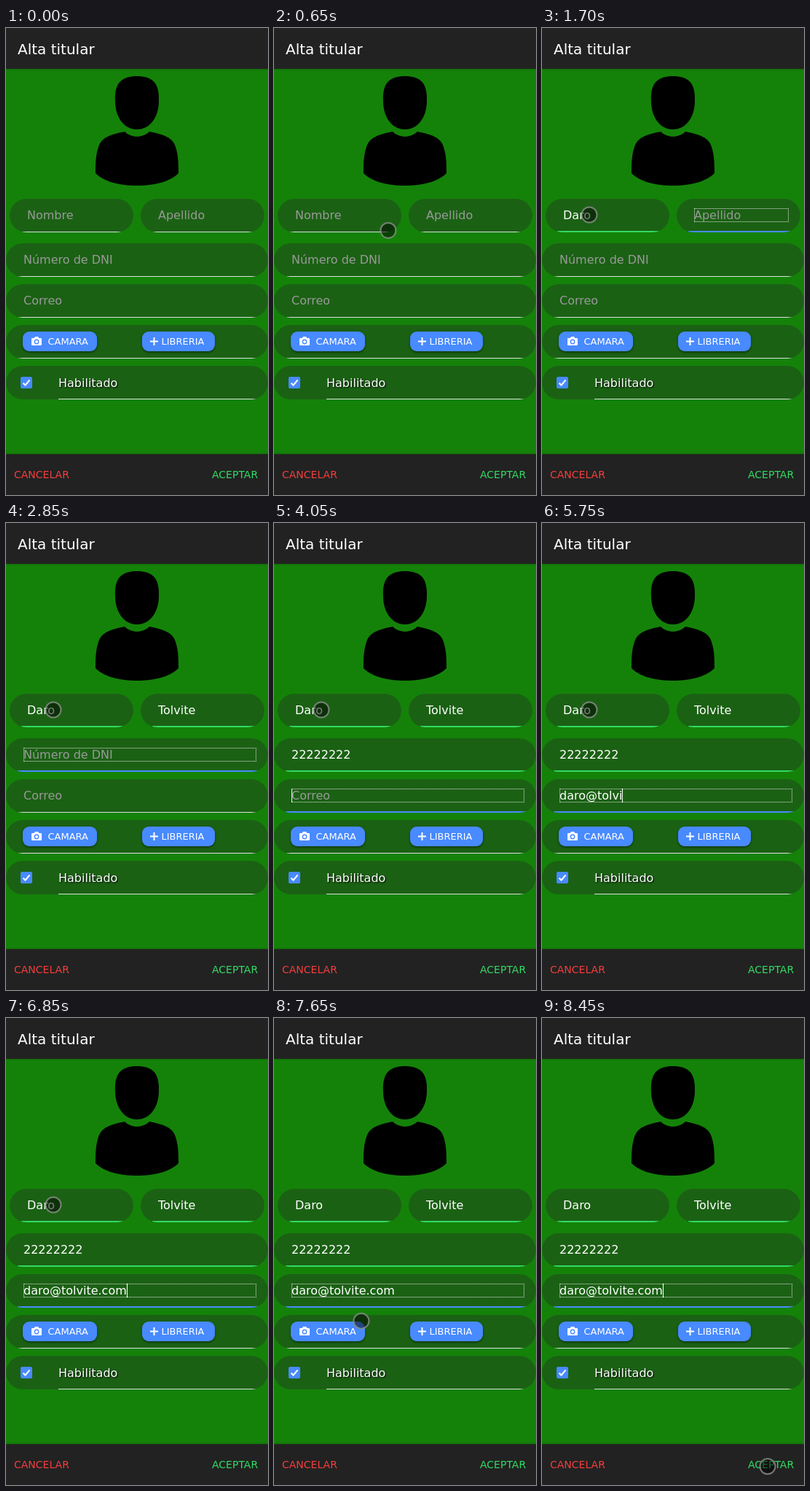
Write an HTML page that moves like this. It is 360 px wide and 640 px high and loops after 8.5 s.

```html
<!DOCTYPE html>
<html lang="es">
<head>
<meta charset="utf-8">
<title>Alta</title>
<style>
  html, body { margin: 0; width: 100%; height: 100%; overflow: hidden; background: #148209; }
  body { position: relative; font: 16px/19px "DejaVu Sans", sans-serif; color: #fff; }
  svg { position: absolute; left: 0; top: 0; }
  .pill { position: absolute; height: 46px; border-radius: 23px; overflow: hidden; background: #1b6114; }
  .line { position: absolute; left: 16px; right: 0; bottom: 0; height: 1px; background: #dedede; }
  .input { position: absolute; left: 24px; right: 16px; top: 13px; height: 19px; white-space: pre; }
  .input.focus { outline: 1px dotted #e4e4e4; outline-offset: -1px; }
  .hint { position: absolute; left: 0; top: 0; color: #999; }
  .value { display: inline-block; height: 19px; border-right: 1px solid transparent; }
  .value.caret { border-color: #fff; }
  .button { position: absolute; top: 416px; height: 27px; border-radius: 9px; background: #488aff;
    box-shadow: 0 2px 2px rgba(0,0,0,.25), 0 1px 4px rgba(0,0,0,.2); }
  .bar { position: absolute; left: 0; width: 100%; height: 56px; background: #222; box-shadow: 0 0 3px rgba(0,0,0,.4); }
  .label { text-shadow: 1px 1px 2px #000; }
  #cursor { position: absolute; left: -11.5px; top: -11.5px; width: 19px; height: 19px; border-radius: 50%;
    border: 2px solid rgba(160,165,160,.7); background: rgba(0,0,0,.5); }
</style>
</head>
<body>
<div class="bar" style="top:0"></div>
<div class="bar" style="bottom:0"></div>
<div class="pill" style="left:0;top:407px;width:360px"><div class="line"></div></div>
<div class="pill" style="left:0;top:463px;width:360px"><div class="line" style="left:72px"></div></div>
<div class="button" style="left:23px;width:102px"></div>
<div class="button" style="left:187px;width:100px"></div>
<svg width="360" height="640" fill="#fff">
  <g fill="#000">
    <path d="M180 66C200 66 211 74 210 100C210 122 198 139 180 139S150 122 150 100C149 74 160 66 180 66Z"/>
    <path d="M163 142C172 151 188 151 197 142C217 146 229 150 233 163C237 175 237 187 237 199C225 211 203 216 180 216S135 211 123 199C123 187 123 175 127 163C131 150 143 146 163 142Z"/>
  </g>
  <text x="16" y="36" font-size="20">Alta titular</text>
  <g font-size="13" font-weight="500">
    <text x="57.5" y="434">CAMARA</text>
    <text x="213.5" y="434">LIBRERIA</text>
  </g>
  <path d="M36 425H38.5L40 423H44L45.5 425H48Q49 425 49 426V434Q49 435 48 435H36Q35 435 35 434V426Q35 425 36 425Z"/>
  <circle cx="42" cy="430" r="2.7" stroke="#488aff" stroke-width="1.4"/>
  <path d="M198 429.5H209M203.5 424V435" stroke="#fff" stroke-width="2"/>
  <rect x="20" y="478" width="16" height="16" rx="2" fill="#488aff"/>
  <path d="M23.5 486.5L26.5 489.5L32.5 482.5" fill="none" stroke="#fff" stroke-width="2"/>
  <text class="label" x="72" y="492">Habilitado</text>
  <g font-size="14">
    <text x="11" y="617" fill="#f53d3d">CANCELAR</text>
    <text x="283" y="617" fill="#32db64">ACEPTAR</text>
  </g>
</svg>
<script>
const LOOP = 8500;
const every = (start, step, n) => Array.from({ length: n }, (_, i) => start + i * step);

// "<" in keys is a backspace
const fields = [
  { x: 5, y: 234, w: 170, hint: 'Nombre', on: 1050, off: 1650,
    keys: 'Daro', times: every(1200, 100, 4) },
  { x: 185, y: 234, w: 170, hint: 'Apellido', on: 1650, off: 2700,
    keys: 'Tolvite', times: every(1950, 100, 7) },
  { x: 0, y: 295, w: 360, hint: 'Número de DNI', on: 2700, off: 3750,
    keys: '22222222', times: every(2950, 100, 8) },
  { x: 0, y: 351, w: 360, hint: 'Correo', on: 3750, off: LOOP,
    keys: 'daro@tolvitec<.com',
    times: [...every(4550, 50, 4), 5000, 5400, 5450, 5600, 5650, 5750, 5850, 5900, 5950,
      6250, 6450, 6550, 6700, 6850] }
];

function add(parent, cls, text = '') {
  const el = document.createElement('div');
  el.className = cls;
  el.textContent = text;
  return parent.appendChild(el);
}

for (const f of fields) {
  const pill = add(document.body, 'pill');
  pill.style.cssText = `left:${f.x}px;top:${f.y}px;width:${f.w}px`;
  f.input = add(pill, 'input');
  f.label = add(f.input, 'hint', f.hint);
  f.value = add(f.input, 'value');
  f.line = add(pill, 'line');
}
const cursor = add(document.body, '');
cursor.id = 'cursor';

function typed(f, t) {
  let s = '';
  f.times.forEach((at, i) => {
    if (t >= at) s = f.keys[i] === '<' ? s.slice(0, -1) : s + f.keys[i];
  });
  return s;
}

// Eased move along a quadratic curve
function glide(t, from, to, a, b, c) {
  const u = Math.min(1, Math.max(0, (t - from) / (to - from)));
  const s = u * u * (3 - 2 * u);
  return a.map((v, i) => (1 - s) ** 2 * v + 2 * s * (1 - s) * b[i] + s * s * c[i]);
}

function draw(t) {
  for (const f of fields) {
    const text = typed(f, t);
    const focus = t >= f.on && t < f.off;
    const blink = t >= 7100 && t < 7700;
    f.value.textContent = text;
    f.label.hidden = text !== '';
    f.input.classList.toggle('focus', focus);
    f.value.classList.toggle('caret', focus && t >= f.on + 200 && !blink);
    f.line.style.height = focus || text ? '2px' : '1px';
    f.line.style.background = focus ? '#488aff' : text ? '#32db64' : '#dedede';
  }
  const rest = [64.5, 255.5];
  const [x, y] = t < 7300
    ? glide(t, 100, 1000, [347, 330], [200, 285], rest)
    : glide(t, 7300, 8150, rest, [110, 491], [309.5, 614]);
  cursor.hidden = t < 150;
  cursor.style.transform = `translate(${x}px,${y}px)`;
}

function frame() {
  draw(performance.now() % LOOP);
  requestAnimationFrame(frame);
}
frame();
</script>
</body>
</html>
```
